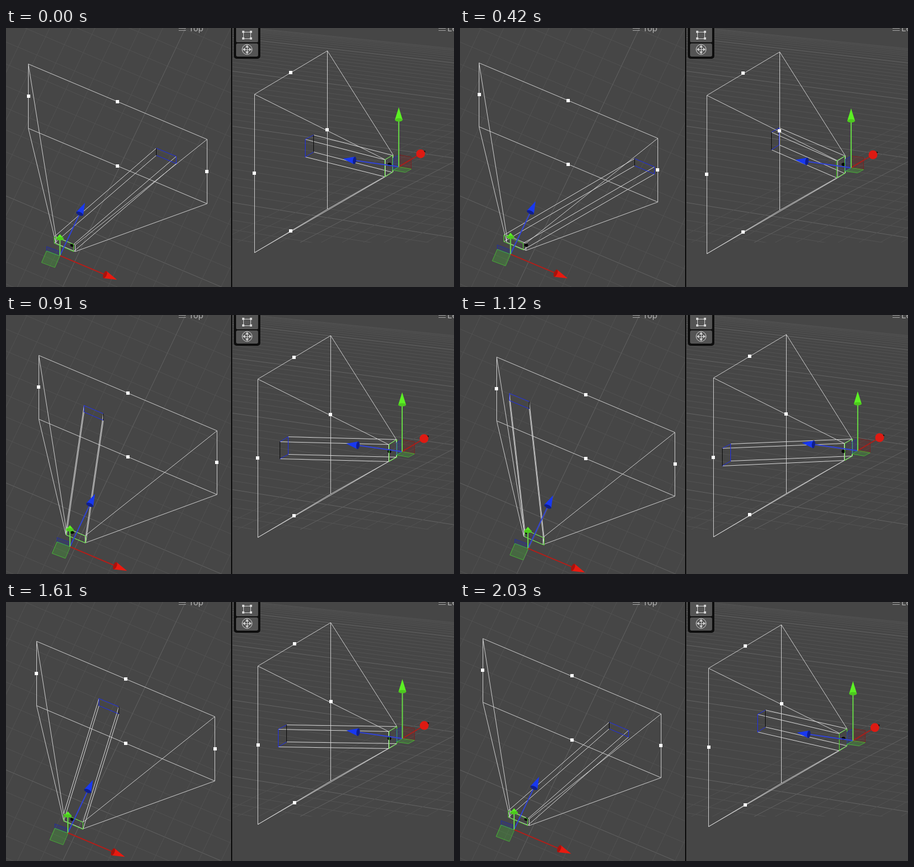
Recreate the animation shown at these times as an HTML page with a canvas. Size 812x471 px, loop 2.1 s.

```html
<!DOCTYPE html>
<html lang="en">
<head>
<meta charset="utf-8">
<title>Scene views</title>
<style>
  html, body { margin: 0; width: 100%; height: 100%; overflow: hidden; background: #464646; }
  main { position: absolute; left: 0; top: 0; width: 812px; height: 471px; overflow: hidden; contain: strict; }
  canvas { display: block; }
  .label {
    position: absolute; top: -8px; color: #b4b4b4;
    font: 15px/18px Inter, Roboto, sans-serif; white-space: nowrap;
  }
</style>
</head>
<body>
<main>
  <canvas id="stage" width="812" height="471"></canvas>
  <span class="label" style="left:331px">Top</span>
  <span class="label" style="left:800px">Left</span>
</main>
<script>
const W = 812, H = 471, LOOP = 2100, STEP = 70;
const WHITE = '#cfcfcf', BLUE = '#1c2cee', GREEN = '#52e02c', BLACK = '#080808';
const live = document.getElementById('stage').getContext('2d');
let g = live;

// Hand-dragged swing of the light: [ms, amount]
const KEYS = [[0, .194], [240, -.06], [420, 0], [700, .498], [1120, 1],
  [1250, 1.05], [1470, .885], [1750, .42], [2030, .203]];

// Each view projects the axes: X across, Y down, Z from the near face to the far face
const topView = {
  X: [323.5, 137], Y: [0, 116.5], Z: [94.7, -200.4],
  near: [101.6, 390.3], drift: [31.5, 13],
  beamNear: [-4.5, -.6], beamTurn: [6.5, 1.5],
  beamFar: [334, 251], beamSwing: [-227, -95],
  gizmo: [-10, 21], up: [0, -39], xArrow: .32, zArrow: .48,
  tiles: { x: [-24, -9], y: [0, -8], z: [-9, 21] },
  speck: [120, 395]
};
const sideView = {
  X: [132, -79], Y: [0, 288.5], Z: [-178, -25.5],
  near: [691.5, 252], drift: [12, -7.5],
  beamNear: [-1.3, .4], beamTurn: [2.7, -.5],
  beamFar: [569.4, 202.4], beamSwing: [-89, 53],
  gizmo: [17.7, 2], up: [0, -108], xArrow: .3, zArrow: .57,
  tiles: { x: [-11, 6], y: [0, -22], z: [22, 3.5] },
  speck: [695, 248], ball: true
};

const add = (a, b, k = 1) => [a[0] + b[0] * k, a[1] + b[1] * k];
const snap = v => Math.round(v - .25) + .5;

// Smooth periodic curve through the keys
function swing(t) {
  t = (t + LOOP) % LOOP;
  const n = KEYS.length;
  const key = i => {
    const turn = Math.floor(i / n), [ms, v] = KEYS[i - turn * n];
    return [ms + turn * LOOP, v];
  };
  const slope = i => {
    const a = key(i - 1), b = key(i + 1);
    return (b[1] - a[1]) / (b[0] - a[0]);
  };
  const i = KEYS.filter(k => k[0] <= t).length - 1;
  const [t0, a] = key(i), [t1, b] = key(i + 1);
  const d = t1 - t0, s = (t - t0) / d, r = 1 - s;
  return r * r * (1 + 2 * s) * a + s * s * (3 - 2 * s) * b
    + d * s * r * (r * slope(i) - s * slope(i + 1));
}

function trace(pts, round) {
  g.beginPath();
  for (const [x, y] of pts) round ? g.lineTo(snap(x), snap(y)) : g.lineTo(x, y);
}

function line(pts, color, width = 1) {
  trace(pts, width === 1);
  g.strokeStyle = color;
  g.lineWidth = width;
  g.stroke();
}

const loop = (pts, color) => line([...pts, pts[0]], color);

function fill(pts, color) {
  trace(pts);
  g.closePath();
  g.fillStyle = color;
  g.fill();
}

function ellipse([x, y], rx, ry, color, turn = 0) {
  g.beginPath();
  g.ellipse(x, y, rx, ry, turn, 0, 7);
  g.fillStyle = color;
  g.fill();
}

function cone(base, tip, r, k, color, dark) {
  const dx = tip[0] - base[0], dy = tip[1] - base[1], n = Math.hypot(dx, dy);
  const side = [-dy / n * r, dx / n * r];
  fill([add(base, side), tip, add(base, side, -1)], color);
  ellipse(base, k, r, dark, Math.atan2(dy, dx));
}

function arrow(from, v, shaft, color, dark) {
  const base = add(from, v, .79);
  line([from, base], shaft, 2);
  cone(base, add(from, v), 7, 3, color, dark);
}

// Corners of a face: top left, top right, bottom right, bottom left
function face(view, center, size) {
  return [[-1, -1], [1, -1], [1, 1], [-1, 1]].map(([x, y]) =>
    add(add(center, view.X, x * size / 2), view.Y, y * size / 2));
}

const join = (a, b, color) => a.forEach((p, i) => line([p, b[i]], color));

function drawGizmo(view, o) {
  const { x, y, z } = view.tiles;
  const tile = (a, b, rgb) => {
    const pts = [o, add(o, a), add(add(o, a), b), add(o, b)];
    fill(pts, `rgba(${rgb}, .25)`);
    loop(pts, `rgba(${rgb}, .8)`);
  };
  tile(x, y, '30, 45, 170');
  if (view.ball) tile(y, z, '130, 28, 24');
  tile(x, z, '70, 200, 50');

  arrow(o, view.Z.map(c => c * view.zArrow), '#3043d8', '#1838f0', '#101f8c');
  const red = view.X.map(c => c * view.xArrow);
  if (view.ball) {
    const end = add(o, red);
    line([o, end], '#a81f1a', 2);
    cone(add(end, [3, -2]), add(end, [9, -5]), 5, 2, BLACK, BLACK);
    ellipse(end, 8, 8, '#de1a12');
  } else {
    arrow(o, red, '#b51d18', '#e81a10', '#a8120c');
  }
  arrow(o, view.up, '#67da45', '#5cf024', '#4cc91e');
}

function drawView(view, s, leftBlue) {
  const c = add(view.near, view.drift, s);
  const far = face(view, add(c, view.Z), 1), near = face(view, c, .108);
  loop(far, WHITE);
  join(far, near, WHITE);
  loop(near, WHITE);

  const beamNear = face(view, add(add(c, view.beamNear), view.beamTurn, s), .108);
  const beamFar = face(view, add(view.beamFar, view.beamSwing, s), .11);
  join(beamNear, beamFar, '#dcdcdc');
  loop(beamFar, BLUE);
  const dark = leftBlue ? [1, 2] : [0, 3];
  line(dark.map(i => beamFar[i]), BLACK);

  ellipse(view.speck, 3.5, 3, BLACK);
  loop(beamNear, GREEN);
  drawGizmo(view, add(c, view.gizmo));

  g.fillStyle = '#fff';
  far.forEach((p, i) => {
    const [x, y] = add(p, add(far[(i + 1) % 4], p, -1), .5).map(Math.round);
    g.fillRect(x - 3, y - 3, 6, 6);
  });
}

function clipped(x, w, h, paint) {
  g.save();
  g.beginPath();
  g.rect(x, 0, w, h);
  g.clip();
  paint();
  g.restore();
}

function gridTop() {
  const ray = (p, dir, color) => line([add(p, dir, -5), add(p, dir, 5)], color);
  for (let i = -12; i <= 12; i++) {
    const color = i ? '#515151' : '#626262';
    ray([0, 305 + i * 40], topView.X, color);
    ray([325 + i * 41, 0], topView.Z, color);
  }
}

function gridSide() {
  for (let i = -18; i < 26; i++) {
    const k = i / 10, y = 78 + 80.5 * k + 19.5 * k * k;
    line([[410, y], [812, y + 52 + k * 6]], i % 10 ? '#535353' : '#646464');
  }
  for (let i = 0; i < 32; i++) {
    const x = 380 + i * 38;
    line([[x, 390], [x + 800, -20 - i * 3]], i % 10 === 4 ? '#626262' : '#515151');
  }
}

function menuIcon(x) {
  g.fillStyle = '#a4a4a4';
  g.fillRect(x, 0, 13, 1);
  g.fillRect(x, 4, 13, 1);
}

function toolbar() {
  const ink = '#d4d4d4';
  const box = (x, y, w, h, r, color) => {
    g.beginPath();
    g.roundRect(x, y, w, h, r);
    g.fillStyle = color;
    g.fill();
  };
  box(413, -8, 48, 64, 5, '#0e0e0e');
  box(417, -6, 40, 32, 2, '#545454');
  box(417, 28, 40, 24, 3, '#545454');
  loop([[430, 7], [443, 7], [443, 19], [430, 19]], ink);
  g.fillStyle = ink;
  for (const x of [428, 442]) for (const y of [5, 17]) g.fillRect(x, y, 4, 4);
  const hub = [437, 39];
  g.beginPath();
  g.arc(...hub, 9, 0, 7);
  g.stroke();
  for (const dir of [[1, 0], [-1, 0], [0, 1], [0, -1]]) {
    line([hub, add(hub, dir, 7)], ink);
    cone(add(hub, dir, 4), add(hub, dir, 8), 3, .5, ink, ink);
  }
}

// The still backdrop is painted once
const still = document.createElement('canvas');
still.width = W;
still.height = H;
g = still.getContext('2d');
g.fillStyle = '#464646';
g.fillRect(0, 0, W, H);
clipped(0, 408, H, gridTop);
clipped(410, 402, 390, gridSide);
menuIcon(313);
menuIcon(784);
g.fillStyle = BLACK;
g.fillRect(408, 0, 2, H);
toolbar();
g = live;

const start = performance.now();
function tick() {
  const t = Math.floor((performance.now() - start) % LOOP / STEP) * STEP;
  const s = swing(t), lagged = swing(t - 50) + .025;
  g.drawImage(still, 0, 0);
  drawView(topView, s, s > .4);
  drawView(sideView, lagged, swing(t + 1) < s);
  requestAnimationFrame(tick);
}
tick();
</script>
</body>
</html>
```
